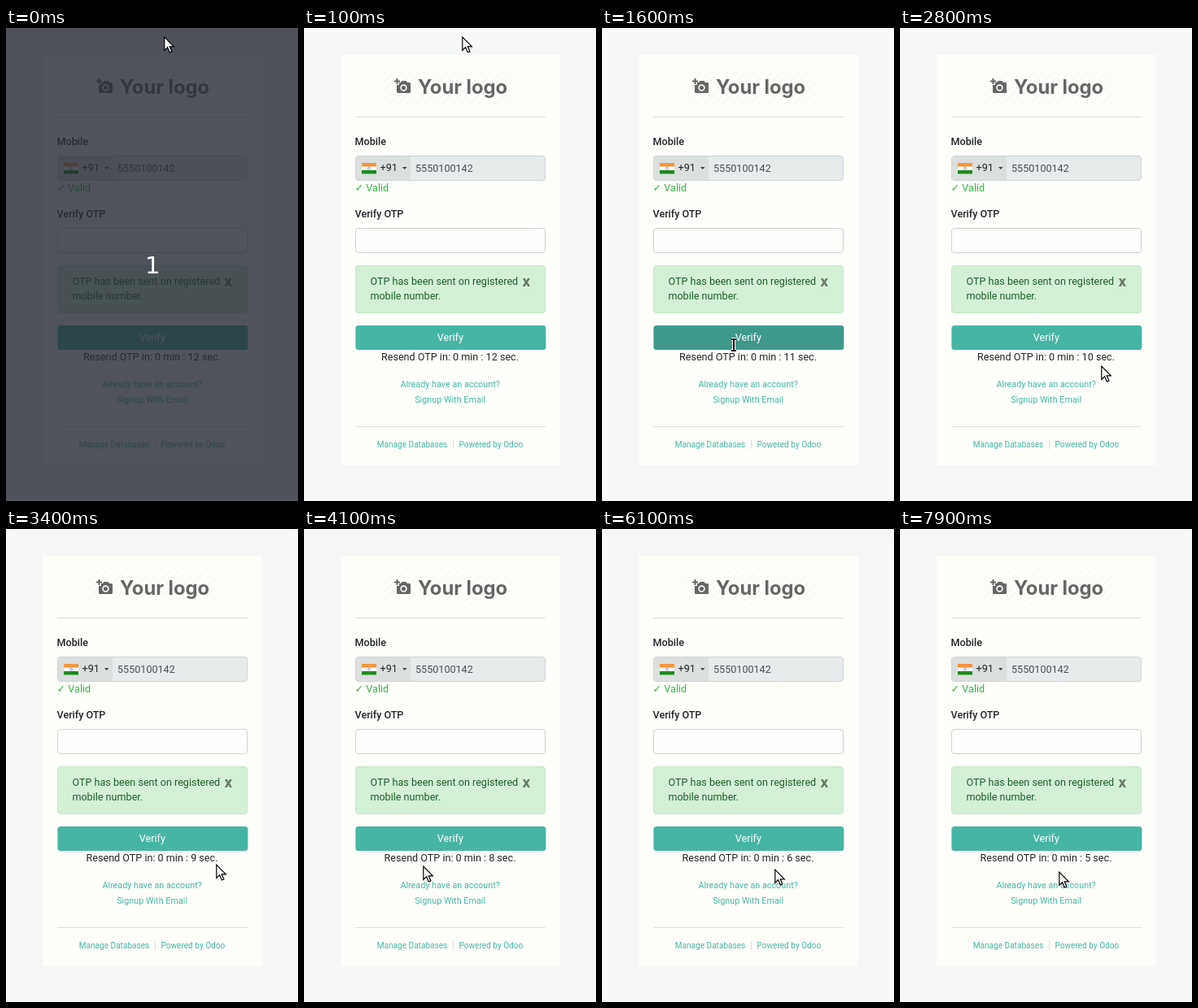
An HTML page that plays this animation: 359x582 px, repeating every 8000 ms.

```html
<!DOCTYPE html>
<html lang="en">
<head>
<meta charset="utf-8">
<title>Verify OTP</title>
<style>
  html, body { margin: 0; width: 100%; height: 100%; overflow: hidden; background: #f6f8f7; }
  svg { display: block; width: 359px; height: 582px; font: 12.6px Roboto, sans-serif; fill: #212529; }
  .label { font-weight: 500; }
  .mid { text-anchor: middle; }
  .link { fill: #47b5a4; font-size: 10.8px; }
  .foot { font-size: 10.08px; }
  .rule { fill: #dcdedb; }
  .field { stroke: #ced3d6; }
</style>
</head>
<body>
<svg viewBox="0 0 359 582">
  <defs>
    <pattern id="hatch" width="11" height="11" patternUnits="userSpaceOnUse">
      <path d="M-1 12L12 -1" stroke="#f8f8f4" stroke-width="1.5"/>
    </pattern>
    <path id="ibeam" d="M-3-7h2l1 1 1-1h2M0-6v12M-3 7h2l1-1 1 1h2" fill="none"/>
  </defs>
  <rect width="359" height="582" fill="#f6f8f7"/>
  <rect x="45" y="33" width="270" height="505" fill="#fefffa"/>

  <rect x="98" y="50" width="164" height="44" fill="url(#hatch)"/>
  <g fill="#666">
    <path d="M114 70h3v-3h2l1.5-2h5l1.5 2h2.500q1.500 0 1.500 1.500v10q0 1.500-1.500 1.500h-14q-1.500 0-1.500-1.500z"/>
    <path d="M113.500 62h2v2.500h2.500v2h-2.500v2.500h-2v-2.500h-2.500v-2h2.500z"/>
    <circle cx="122.500" cy="73.500" r="3.400" stroke="#fefffa" stroke-width="1.600"/>
    <text x="140" y="81" font-family="Inter, sans-serif" font-size="23.800" font-weight="700">Your logo</text>
  </g>
  <rect class="rule" x="63" y="109" width="234" height="1"/>

  <text class="label" x="62.500" y="144">Mobile</text>
  <rect class="field" x="63.500" y="157.500" width="233" height="30" rx="3.500" fill="#e7ebeb"/>
  <path d="M131 158H67q-3 0-3 3v23q0 3 3 3h64z" fill="#dbdfde"/>
  <rect x="71" y="166" width="18" height="13.500" fill="#fff"/>
  <rect x="71" y="166" width="18" height="4.500" fill="#f7943a"/>
  <rect x="71" y="175" width="18" height="4.500" fill="#1d8a20"/>
  <circle cx="80" cy="172.700" r="1.500" fill="none" stroke="#7882b8" stroke-width=".8"/>
  <text x="93.500" y="176">+91</text>
  <path d="M121 171h5.500l-2.750 3z" fill="#444"/>
  <text x="137" y="177" fill="#495057">5550100142</text>
  <g fill="#38b54a">
    <text x="62.500" y="201" font-family="DejaVu Sans, sans-serif">✓</text>
    <text x="76.300" y="201">Valid</text>
  </g>

  <text class="label" x="62.500" y="233">Verify OTP</text>
  <rect class="field" x="63.500" y="246.500" width="233" height="30" rx="3.500" fill="#fefffc"/>

  <rect x="63.500" y="292.500" width="233" height="58" rx="3.500" fill="#d4f0d6" stroke="#c3e9c8"/>
  <g fill="#1d602a">
    <text x="81.400" y="316">OTP has been sent on registered</text>
    <text x="81.400" y="334">mobile number.</text>
  </g>
  <text class="mid" x="273.300" y="318" font-size="18.900" font-weight="700" fill="#6a786b">x</text>

  <rect id="button" x="63.400" y="366" width="234" height="30" rx="3.500"/>
  <text class="mid" x="179.900" y="385" fill="#fff">Verify</text>
  <text id="resend" class="mid" x="179.500" y="409"></text>
  <text class="link mid" x="179.600" y="442">Already have an account?</text>
  <text class="link mid" x="179.600" y="461">Signup With Email</text>
  <rect class="rule" x="63" y="490" width="234" height="1"/>
  <text class="link foot" x="89.700" y="516">Manage Databases</text>
  <rect class="rule" x="183" y="507" width="1" height="11"/>
  <text class="link foot" x="190.500" y="516">Powered by Odoo</text>

  <g id="dim">
    <rect width="359" height="582" fill="#262a34" opacity=".8"/>
    <text class="mid" x="180.300" y="302" font-family="DejaVu Sans, sans-serif" font-size="29" fill="#fff">1</text>
  </g>
  <g id="pointer">
    <path id="arrow" d="M.8 1.200V17.400L4.600 13.800 7.300 20 9.900 18.900 7.200 12.800H12.300z" fill="#fff" stroke="#000" stroke-width="1.200"/>
    <g id="beam">
      <use href="#ibeam" stroke="#fff" stroke-width="4"/>
      <use href="#ibeam" stroke="#000" stroke-width="2"/>
    </g>
  </g>
</svg>
<script>
const LOOP = 8000, STEP = 100;
const $ = id => document.getElementById(id);

const home = { x: 194, y: 10 };
const stops = [
  { from: 300, to: 600, x: 151, y: 243 },
  { from: 900, to: 1600, x: 162, y: 390 },
  { from: 1700, to: 2300, x: 228, y: 415 },
  { from: 2600, to: 2800, x: 247, y: 415 },
  { from: 3300, to: 3400, x: 258, y: 412 },
  { from: 3600, to: 4100, x: 146, y: 414 },
  { from: 4400, to: 5100, x: 230, y: 411 },
  { from: 5800, to: 6100, x: 212, y: 418 },
  { from: 7900, to: 7900, x: 195, y: 421 }
];

const show = (id, on) => $(id).setAttribute('visibility', on ? 'visible' : 'hidden');

// Straight, evenly stepped moves; leftward ones arch upwards.
function pointerAt(t) {
  let { x, y } = home;
  for (const stop of stops) {
    if (t < stop.from) break;
    const u = Math.min(1, (t - stop.from + STEP) / (stop.to - stop.from + STEP));
    const lift = Math.max(0, x - stop.x) * 0.15;
    x += (stop.x - x) * u;
    y += (stop.y - y) * u - 4 * lift * u * (1 - u);
  }
  return { x: Math.round(x), y: Math.round(y) };
}

function draw(time) {
  const t = Math.floor(time % LOOP / STEP) * STEP;
  const { x, y } = pointerAt(t);
  const overText = y > 246 && y < 393;
  const hovered = y > 366 && y < 396;
  const seconds = 12 - Math.floor((t + 60) / 1015);

  $('pointer').setAttribute('transform', `translate(${x} ${y})`);
  show('arrow', !overText);
  show('beam', overText);
  show('dim', t < STEP);
  $('button').setAttribute('fill', hovered ? '#3e998a' : '#47b5a4');
  $('resend').textContent = `Resend OTP in: 0 min : ${seconds} sec.`;
}

const origin = performance.now();
function tick() {
  draw(performance.now() - origin);
  requestAnimationFrame(tick);
}
tick();
</script>
</body>
</html>
```
